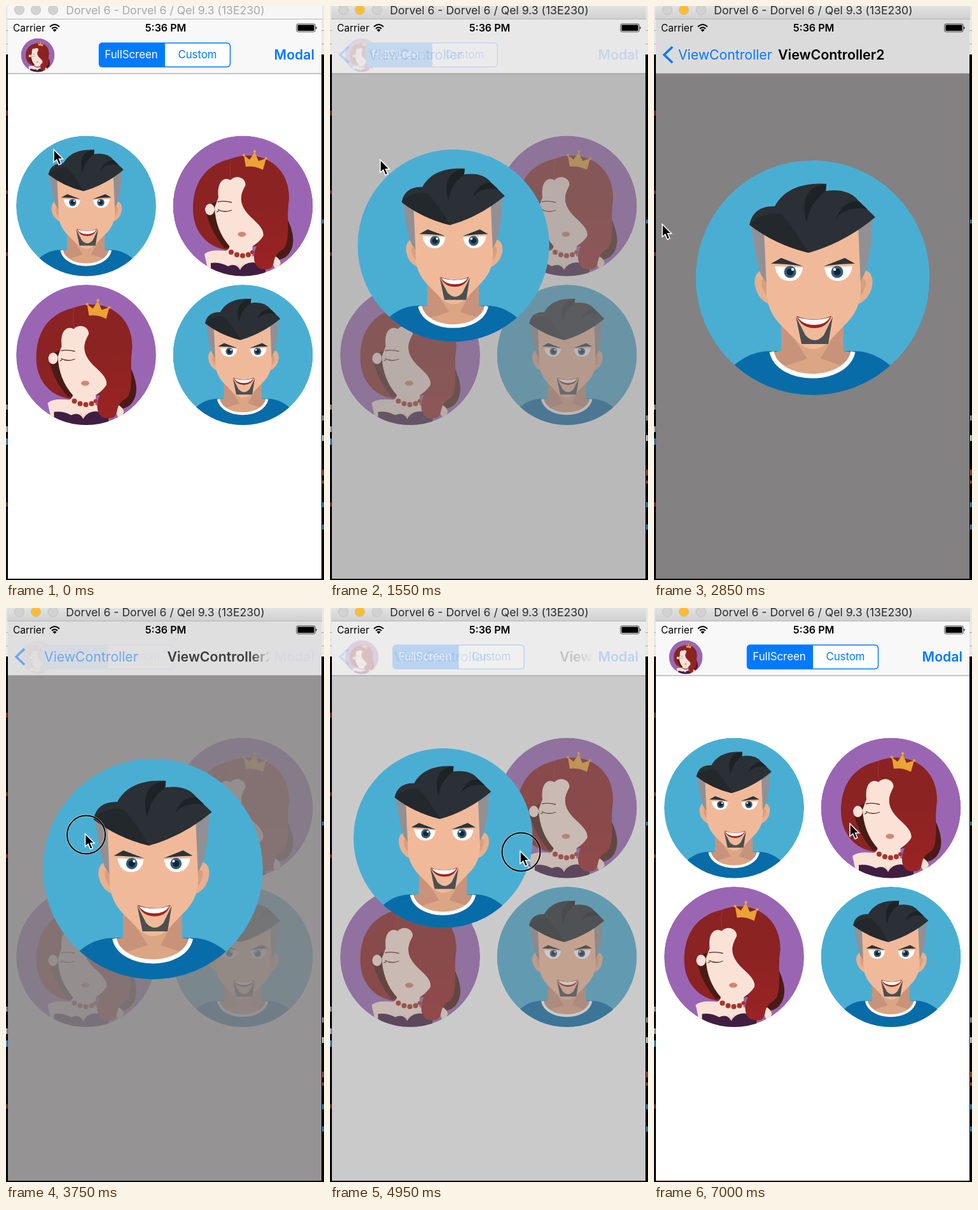
Recreate the animation shown at these times as an HTML page. Size 500 by 900 pixels, loop 7050 ms.

```html
<!DOCTYPE html>
<html lang="en">
<head>
<meta charset="utf-8">
<title>Avatar zoom transition</title>
<style>
  html, body { margin: 0; width: 100%; height: 100%; overflow: hidden; background: #000; }
  svg { display: block; width: 500px; height: 900px; font-family: Inter, Roboto, sans-serif; }
  .blue { fill: #007aff; }
  .bold { font-weight: 600; }
</style>
</head>
<body>
<svg viewBox="0 0 500 900">
  <defs>
    <clipPath id="manClip"><circle cx="249.5" cy="426" r="184"/></clipPath>
    <clipPath id="womanClip"><circle cx="372.5" cy="313.5" r="110"/></clipPath>
    <linearGradient id="fade" gradientUnits="userSpaceOnUse" x1="385" x2="415" y1="0" y2="0">
      <stop offset="0" stop-color="#fff"/><stop offset="1" stop-color="#000"/>
    </linearGradient>
    <mask id="titleMask" maskUnits="userSpaceOnUse" x="0" y="50" width="500" height="56">
      <rect y="50" width="500" height="56" fill="url(#fade)"/>
    </mask>
    <linearGradient id="chrome" x2="0" y2="1">
      <stop offset="0" stop-color="#e3e2e3"/><stop offset="1" stop-color="#d2d1d2"/>
    </linearGradient>
    <linearGradient id="lock" x2="0" y2="1">
      <stop offset=".3" stop-color="#8b2322"/><stop offset="1" stop-color="#9b2324"/>
    </linearGradient>

    <g id="manArt" clip-path="url(#manClip)">
      <circle cx="249.5" cy="426" r="184" fill="#4aaed3"/>
      <path fill="#086ca8" d="M110 580Q140 542 182 541H316Q356 542 390 582V620H110Z"/>
      <path fill="#dca584" d="M200 480H298V543L316 543C304 592 196 592 182 543L200 541Z"/>
      <path fill="#c8937a" d="M200 490V541L184 543Q194 556 207 564L241 553ZM298 490V541L315 543Q306 556 293 563L262 553Z"/>
      <path fill="none" stroke="#fff" stroke-width="7" d="M185 542C196 593 302 593 313 542"/>
      <g id="ear">
        <path fill="#e9b08f" d="M180 418C164 408 156 424 159 439Q163 459 180 467Z"/>
        <path fill="#d99f7f" d="M180 428Q168 424 169 437Q172 451 180 456Z"/>
      </g>
      <use href="#ear" transform="translate(502 0) scale(-1 1)"/>
      <path fill="#929094" d="M153 342L180 352L177 435L168 421Q157 385 153 342ZM343 332L318 350L323 435L331 420Q343 385 343 332Z"/>
      <path fill="#f0ba9a" d="M173 352L177 440Q175 475 199 500L227 528Q250 548 273 528L300 500Q327 475 325 438L321 345L243 375Z"/>
      <path fill="#2a3035" d="M150 343Q156 313 190 314C202 291 228 276 271 279L270 290Q306 285 322 306L348 331Q300 371 243 387Q190 374 150 343Z"/>
      <path fill="#23282c" d="M150 343Q170 322 200 326Q222 350 243 387Q190 374 150 343Z"/>
      <path fill="#1d2226" d="M271 279C243 282 229 302 240 340Q244 309 270 290ZM322 306Q298 304 286 334Q300 314 335 318Z"/>
      <path fill="#2c3439" d="M184 404L200 395L234 408Q208 404 184 404ZM316 404L300 395L267 408Q292 404 316 404Z"/>
      <g id="eye">
        <path fill="#fff" d="M190 408L234 410Q231 431 213 431Q194 431 190 408Z"/>
        <circle cx="214" cy="417" r="9.5" fill="#2f5f80"/>
        <circle cx="214" cy="417" r="5.5" fill="#17242e"/>
        <circle cx="218" cy="413" r="2.2" fill="#fff"/>
      </g>
      <use href="#eye" transform="translate(502 0) scale(-1 1)"/>
      <path fill="#4c4f50" d="M223 487L238 516Q245 524 253 524Q260 524 267 516L281 487L274 530H232Z"/>
      <path fill="#9e2620" d="M224 486Q252 497 279 486Q272 505 252 505Q232 505 224 486Z"/>
      <path fill="#fff" d="M226 488Q252 496 277 488Q270 500 252 500Q234 500 226 488Z"/>
    </g>

    <g id="womanArt" clip-path="url(#womanClip)">
      <circle cx="372.5" cy="313.5" r="110" fill="#9a66b4"/>
      <path fill="#4a1b14" d="M438 325Q456 358 450 378Q443 400 420 398L405 350Z"/>
      <path fill="#8b2322" d="M352 240C400 222 446 250 445 302L438 370L350 383C312 378 294 350 294 318C294 274 317 248 352 240Z"/>
      <path fill="#4a1b14" d="M313 314Q318 350 344 380L356 378L335 305Z"/>
      <path fill="#fbe2d7" d="M320 425L312 389Q320 381 346 384Q353 381 352 370H388L387 392L408 400V425ZM416 398L421 391Q430 395 432 403L425 415Z"/>
      <path fill="#3f1e42" d="M322 427V403Q335 401 349 408Q362 402 368 414Q374 402 389 402L408 408V427Z"/>
      <path fill="#fbe2d7" d="M334 300C331 272 345 268 353 273C362 263 380 270 376 284C366 298 369 312 382 327C395 340 405 348 405 360Q398 372 380 381Q363 386 351 376C337 360 329 340 328 316Z"/>
      <ellipse cx="320.5" cy="319" rx="7.5" ry="9" fill="#fbe2d7"/>
      <path fill="url(#lock)" d="M376 282C364 304 371 316 384 330C398 343 408 352 404 362C384 384 386 412 406 413C430 414 412 394 435 382C449 371 440 330 445 302C437 260 404 252 376 282Z"/>
      <path fill="none" stroke="#a13c36" stroke-width=".8" d="M354 241Q350 253 354 272"/>
      <path fill="none" stroke="#5b2a21" stroke-width="1.3" d="M333 307Q344 305 355 308M333 319Q343 325 355 320M335 321L331 323"/>
      <ellipse cx="371" cy="358" rx="6.5" ry="4" fill="#d88873"/>
      <path stroke="#b97e75" stroke-width=".8" d="M365 358H377"/>
      <g fill="#a9332b">
        <circle cx="354" cy="386" r="4"/><circle cx="363" cy="390" r="4"/><circle cx="372" cy="391.5" r="4"/>
        <circle cx="381" cy="390" r="4"/><circle cx="387" cy="386" r="3"/>
      </g>
      <path fill="none" stroke="#e4b6a8" d="M363 404L368 412L373 404"/>
      <g fill="#eaa334">
        <path d="M374 234L383 241L391 229L397 243L409 239L404 257Q390 250 377 252Z"/>
        <circle cx="374" cy="234" r="2"/><circle cx="391" cy="228" r="2.2"/><circle cx="409" cy="239" r="2"/>
      </g>
    </g>
    <g id="man" transform="scale(.0054348) translate(-249.5 -426)"><use href="#manArt"/></g>
    <g id="woman" transform="scale(.0090909) translate(-372.5 -313.5)"><use href="#womanArt"/></g>
  </defs>

  <rect width="500" height="900"/>
  <rect width="500" height="76" fill="#e9e8e9"/>
  <path stroke="#aaa" d="M0 38.5H500M0 59.5H500"/>
  <g id="specks"></g>

  <rect x="3" y="20" width="493" height="878" fill="#fff"/>
  <use href="#woman" transform="translate(372.5 313.5) scale(110)"/>
  <use href="#woman" transform="translate(126 547) scale(110)"/>
  <use href="#man" transform="translate(372.5 547) scale(110)"/>
  <rect id="dim" x="3" y="106" width="493" height="792" fill="#838182"/>
  <use id="hero" href="#man"/>

  <rect id="bar" x="3" y="20" width="493" height="86"/>
  <path stroke="#8f8e90" d="M3 106H496"/>
  <text x="11" y="40" font-size="15.5">Carrier</text>
  <path fill="none" stroke="#000" stroke-width="2" d="M69 32.5Q76.5 25.5 84 32.5M72 35.5Q76.5 31.5 81 35.5"/>
  <path d="M73.5 37.5Q76.5 35 79.5 37.5L76.5 40.5Z"/>
  <text class="bold" x="251" y="40" font-size="16" text-anchor="middle">5:36 PM</text>
  <rect x="456.8" y="28" width="29.4" height="12.6" rx="2.5" fill="none" stroke="#000" stroke-width=".7"/>
  <rect x="458.4" y="29.6" width="26.2" height="9.4" rx="1.2"/>
  <path d="M487.2 32Q490 34.3 487.2 36.6Z"/>

  <g id="out">
    <use href="#woman" transform="translate(50 77) scale(26.5)"/>
    <text class="blue bold" x="485" y="84" font-size="21.2" text-anchor="end">Modal</text>
    <g id="tabs">
      <rect x="146.5" y="58" width="206" height="37.5" rx="5" fill="#fff" stroke="#007aff" stroke-width="1.5"/>
      <path class="blue" d="M250 58V95.5H151Q146 95.5 146 90.5V63Q146 58 151 58Z"/>
      <g font-size="16.8" text-anchor="middle">
        <text x="197" y="82" fill="#fff">FullScreen</text>
        <text class="blue" x="301" y="82">Custom</text>
      </g>
    </g>
  </g>
  <g id="back">
    <path fill="none" stroke="#007aff" stroke-width="3.6" d="M29 64L16 76.5L29 89"/>
    <text id="backText" class="blue" y="84" font-size="21.2">ViewController</text>
  </g>
  <g mask="url(#titleMask)">
    <text id="title" class="bold" y="84" font-size="21.4">ViewController2</text>
  </g>

  <rect id="chromeBar" x="2" width="495" height="20"/>
  <path stroke="#b5b4b5" d="M2 20.5H497"/>
  <g stroke="#bdbcbd" stroke-width=".8">
    <circle cx="21" cy="6" r="7.6" fill="#d3d2d3"/>
    <circle id="amber" cx="47" cy="6" r="7.6"/>
    <circle cx="74" cy="6" r="7.6" fill="#d3d2d3"/>
  </g>
  <text id="windowName" x="250.5" y="13" font-size="17.6" text-anchor="middle">Dorvel 6 - Dorvel 6 / Qel 9.3 (13E230)</text>

  <g id="ring" fill="none">
    <circle r="30" stroke="#fff" stroke-width="3.6" stroke-opacity=".5"/>
    <circle r="30" stroke="#000" stroke-width="2"/>
  </g>
  <path id="cursor" stroke="#fff" stroke-width="1.5" d="M0 0V20L4.7 16L8 24L11.8 22.3L8.5 14.7H14.5Z"/>
</svg>
<script>
const LOOP = 7050, STEP = 50;
const ACTIVATE = 1200, PUSH = 1240, PRESS = 3150, RELEASE = 5050;

// [time, value] rows, linear between them
const zoomPop = [[3200, 1], [4250, .715], [4950, .42], [5050, .38], [5350, .04], [5450, 0]];
const navPop = [[3200, 1], [4250, .61], [4950, .42], [5050, .38], [5350, .045], [5450, 0]];
const cursorX = [[0, 75], [900, 79], [1900, 79], [2700, 13], [3200, 13], [4250, 226], [4950, 299], [5050, 303], [5250, 308]];
const cursorY = [[0, 225], [900, 241], [1900, 241], [2700, 342], [3200, 342], [4250, 365], [4950, 381], [5050, 378], [5250, 338]];

const $ = id => document.getElementById(id);
const set = (id, attrs) => {
  for (const name in attrs) $(id).setAttribute(name, attrs[name]);
};
const clamp = v => Math.min(1, Math.max(0, v));
const smooth = v => (v = clamp(v), v * v * (3 - 2 * v));
const move = (x, y) => `translate(${x} ${y})`;
// bar items stay faint until they have nearly arrived
const faint = v => .33 * v + .67 * v ** 6;

function track(rows, t) {
  const i = rows.findIndex(row => row[0] > t);
  if (i < 0) return rows[rows.length - 1][1];
  if (i === 0) return rows[0][1];
  const [t0, a] = rows[i - 1], [t1, b] = rows[i];
  return a + (b - a) * (t - t0) / (t1 - t0);
}

function draw(t) {
  const pushing = t < 3000;
  const zoom = pushing ? smooth((t - PUSH) / 580) : track(zoomPop, t);
  const nav = pushing ? smooth((t - PUSH) / 440) : track(navPop, t);
  const x = track(cursorX, t), y = track(cursorY, t);
  const active = t >= ACTIVATE;

  set('dim', { opacity: zoom });
  set('hero', { transform: `${move(126 + 123.5 * zoom, 313.5 + 112.5 * zoom)} scale(${110 + 74 * zoom})` });

  const tone = Math.round(249 - 29 * zoom);
  set('bar', { fill: `rgb(${tone},${tone - 1},${tone})` });
  set('out', { opacity: faint(1 - zoom) });
  set('tabs', { transform: move(-113 * nav, 0) });
  set('back', { opacity: faint(zoom) });
  set('backText', { x: 38 + 108 * (1 - nav) });
  set('title', { x: 195 + 286 * (1 - nav), opacity: pushing ? clamp((zoom - .6) / .4) : zoom ** 2 });

  set('chromeBar', { fill: active ? 'url(#chrome)' : '#f6f6f6' });
  set('amber', { fill: active ? '#ffbd2e' : '#d3d2d3' });
  set('windowName', { fill: active ? '#2b2a2b' : '#a9a8a9' });

  set('cursor', { transform: move(x, y) });
  set('ring', {
    transform: move(x + 1.5, y + 1.5),
    visibility: t >= PRESS && t < RELEASE ? 'visible' : 'hidden'
  });
}

// Slivers of the editor behind the window: x, y, height, colour
const slivers = [
  [0, 164, 8, '#712a25'], [0, 289, 6, '#712a25'], [0, 386, 6, '#712a25'],
  [0, 625, 8, '#888'], [0, 659, 9, '#aaa'], [0, 678, 10, '#4d86bd'], [0, 778, 7, '#712a25'],
  [497, 335, 6, '#398bb1'], [497, 642, 8, '#999'], [497, 673, 9, '#ddd'],
  [497, 727, 9, '#ad4a36'], [497, 744, 5, '#ad4a36'], [497, 778, 8, '#398bb1'], [497, 813, 8, '#398bb1']
];
$('specks').innerHTML = slivers.map(([x, y, h, c]) =>
  `<rect x="${x}" y="${y}" width="2.5" height="${h}" fill="${c}"/>`).join('');

const start = performance.now();
function frame() {
  const t = (performance.now() - start) % LOOP;
  draw(Math.floor(t / STEP) * STEP);
  requestAnimationFrame(frame);
}
frame();
</script>
</body>
</html>
```
